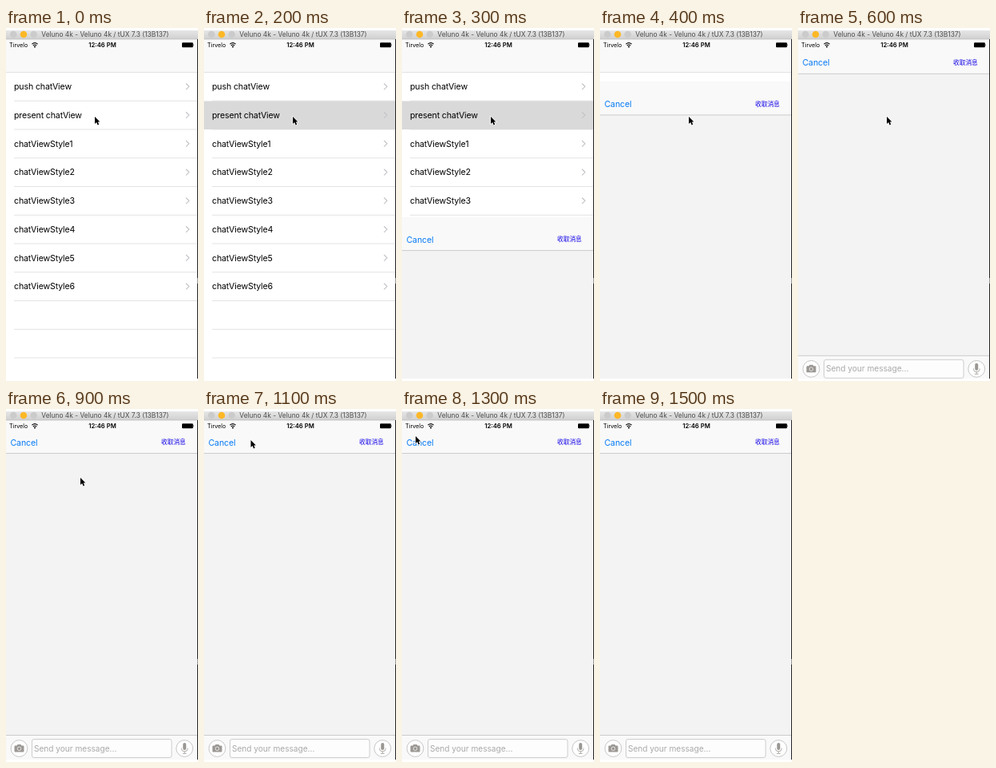
Animation of 240x442 px, one loop 1.7 s. Source, as an HTML page:

```html
<!DOCTYPE html>
<html lang="en">
<head>
<meta charset="utf-8">
<title>Chat view presentation</title>
<style>
  html, body { margin: 0; height: 100%; overflow: hidden; background: #fff; }
  svg { display: block; width: 100vw; height: 100vh; font-family: Inter, Roboto, sans-serif; }
  .line { stroke: #dcdcde; stroke-width: .8; }
  .edge { stroke: #c0c0c2; stroke-width: .8; }
  .chevron { fill: none; stroke: #c4c4c9; stroke-width: 1.2; }
  .round { fill: #fff; stroke: #b9b9b9; stroke-width: .8; }
  .glyph { fill: #9b9894; }
  .mid { text-anchor: middle; }
  .tight { font-size: 10.6px; letter-spacing: -.14px; }
  #cursor { stroke: #fff; stroke-width: 1.2; paint-order: stroke; }
</style>
</head>
<body>
<svg viewBox="0 0 240 442">
  <defs>
    <clipPath id="screen"><rect y="14" width="239" height="425"/></clipPath>
    <clipPath id="capture"><rect y="3" width="240" height="436"/></clipPath>
    <linearGradient id="chrome" x2="0" y2="1">
      <stop stop-color="#e6e6e6"/><stop offset="1" stop-color="#d0d0d0"/>
    </linearGradient>
  </defs>

  <g clip-path="url(#screen)">
    <rect id="pressed" y="91.5" width="239" height="35.5" fill="#d9d9d9"/>
    <g id="rows" class="tight"></g>
    <rect y="14" width="239" height="41.5" fill="#f9f9f9"/>
    <path class="line" d="M0 55.5H239"/>

    <g id="modal">
      <rect y="14" width="239" height="425" fill="#f3f3f3"/>
      <rect y="14" width="239" height="41.5" fill="#f9f9f9"/>
      <path class="edge" d="M0 55.5H239"/>
      <text class="tight" x="5.5" y="45.6" fill="#087bf5">Cancel</text>
      <text x="194" y="44.3" font-size="7.7" fill="#1200e6" style="font-family:'Noto Sans CJK SC','Noto Sans CJK',sans-serif">收取消息</text>
      <rect y="408.5" width="239" height="31" fill="#f9f9f9"/>
      <path class="edge" d="M0 408.5H239"/>
      <circle class="round" cx="16.5" cy="425" r="10.4"/>
      <path class="glyph" d="M11.5 421.5h2l1-1.5h4l1 1.5h2q1 0 1 1v6q0 1-1 1h-10q-1 0-1-1v-6q0-1 1-1z"/>
      <circle cx="16.5" cy="425.3" r="2.3" fill="none" stroke="#fff" stroke-width=".7"/>
      <rect x="32.5" y="413.5" width="174.5" height="23" rx="2.5" fill="#fdfdfd" stroke="#c2c2c2" stroke-width=".8"/>
      <text x="35" y="428.6" font-size="10.1" fill="#a9a9ac">Send your message...</text>
      <circle class="round" cx="223.2" cy="425" r="10.4"/>
      <rect class="glyph" x="221.2" y="418" width="4" height="9" rx="2"/>
      <path d="M219.4 424.5v1q0 3.3 3.8 3.3t3.8-3.3v-1M223.2 429v2.3M220.8 431.4h4.8" fill="none" stroke="#9b9894" stroke-width=".8"/>
    </g>

    <text x="4" y="24" font-size="7.2">Tirvelo</text>
    <text class="mid" x="120.5" y="24.2" font-size="7.7" font-weight="600">12:46 PM</text>
    <path d="M32.4 20.2Q36 16.9 39.6 20.2M33.8 22Q36 20 38.2 22" fill="none" stroke="#000" stroke-width="1.1"/>
    <circle cx="36" cy="23.5" r="1"/>
    <rect x="220" y="18.2" width="13.8" height="6" rx="1"/>
    <path d="M234.4 20v2.4q1.2-1.2 0-2.4z"/>
  </g>

  <rect y="3" width="240" height="11" fill="url(#chrome)"/>
  <path d="M0 14H240" stroke="#b4b4b4" stroke-width=".6"/>
  <g fill="#cbcbcb">
    <circle cx="9.3" cy="8" r="4.3"/>
    <circle cx="22" cy="8" r="4.3" fill="#fdb827"/>
    <circle cx="34.7" cy="8" r="4.3"/>
  </g>
  <text class="mid" x="124" y="11.2" font-size="8.4" fill="#4c4c4c">Veluno 4k - Veluno 4k / tUX 7.3 (13B137)</text>
  <path d="M239.5 14V439" stroke="#26262a"/>
  <path d="M239.5 313V320" stroke="#999"/>

  <g clip-path="url(#capture)">
    <path id="cursor" d="M0 0V9L2.1 7.1L3.6 10.4L5.2 9.7L3.8 6.5H6.4Z"/>
  </g>
</svg>
<script>
const LOOP = 1700, STEP = 100;
const $ = id => document.getElementById(id);

const labels = ["push chatView", "present chatView", ...[1, 2, 3, 4, 5, 6].map(n => "chatViewStyle" + n), "", ""];
$("rows").innerHTML = labels.map((label, i) => {
  const y = 55.5 + 35.75 * i;
  const chevron = `<path class="chevron" d="M225 ${y + 14}l3.8 3.8l-3.8 3.8"/>`;
  return `<text x="10" y="${y + 21.6}">${label}</text>${label && chevron}
    <path class="line" d="M10 ${y + 35.75}H239"/>`;
}).join("");

// Critically damped spring that carries the sheet up from the bottom
const sheetOffset = t => {
  const x = Math.max(0, t - 220) / 50;
  return t >= 700 ? 0 : 425 * (1 + x) * Math.exp(-x);
};

// Pointer way-points: time, x, y
const path = [[0, 111, 111], [700, 111, 111], [800, 107, 106], [900, 93, 86], [1000, 74, 59],
  [1100, 58.5, 39], [1200, 34, 36], [1300, 17, 34], [1400, 8, 18], [1500, 8, -12], [LOOP, 8, -12]];

function pointer(t) {
  const i = path.findIndex(p => p[0] > t);
  const [a, b] = [path[i - 1], path[i]];
  const k = (t - a[0]) / (b[0] - a[0]);
  return [1, 2].map(n => a[n] + (b[n] - a[n]) * k);
}

function draw(now) {
  const t = Math.floor(now % LOOP / STEP) * STEP;
  $("pressed").style.display = t >= 100 ? "" : "none";
  $("modal").setAttribute("transform", `translate(0 ${sheetOffset(t)})`);
  $("cursor").setAttribute("transform", `translate(${pointer(t)})`);
  requestAnimationFrame(draw);
}
draw(0);
</script>
</body>
</html>
```
